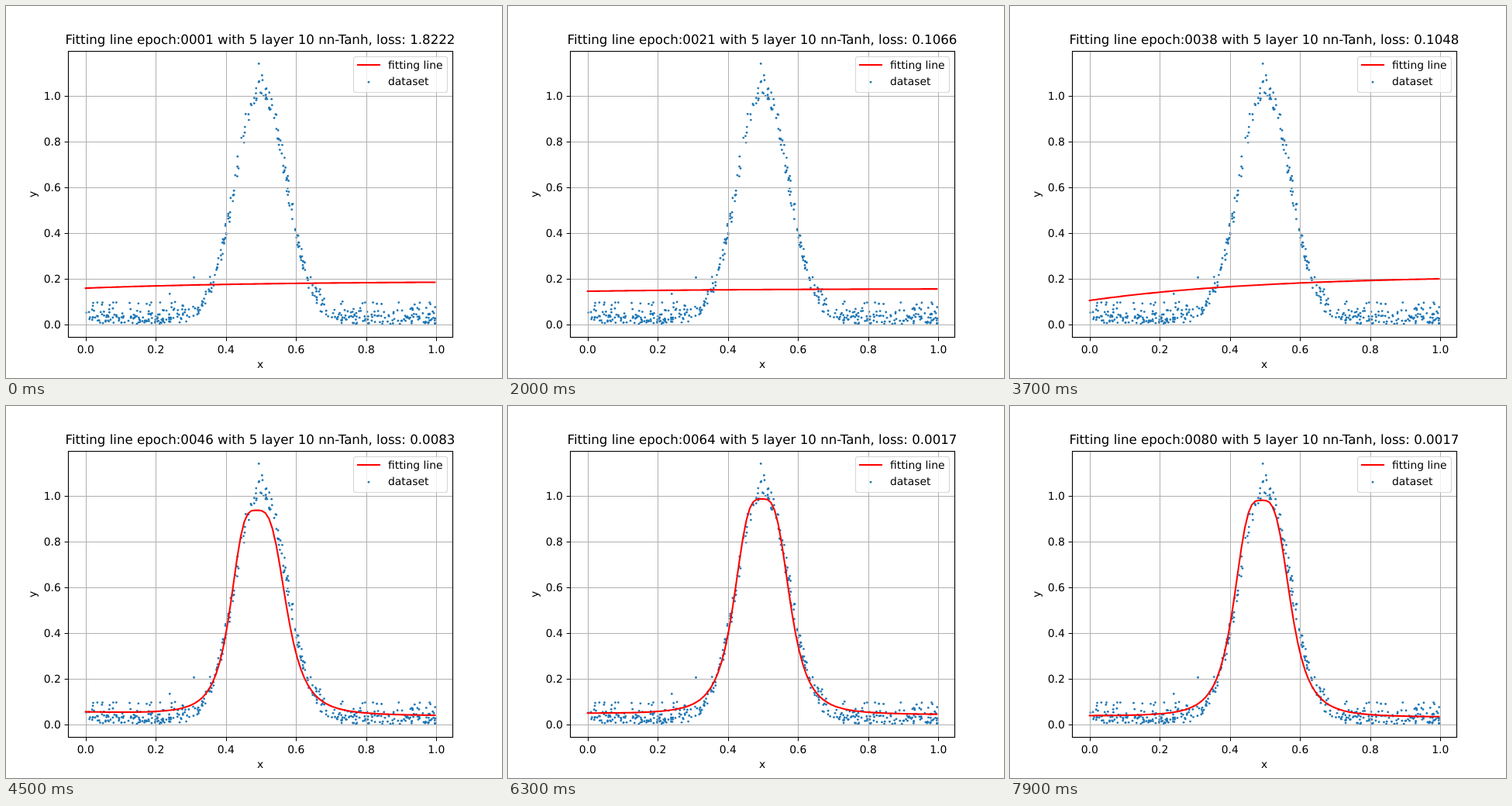
An HTML page with a canvas for the animation above (8000 ms loop, 640 by 480 pixels).

```html
<!DOCTYPE html>
<html lang="en">
<head>
<meta charset="utf-8">
<title>Curve fitting</title>
<style>
html, body { margin: 0; width: 100%; height: 100%; overflow: hidden; background: #fff; }
canvas { display: block; }
</style>
</head>
<body>
<canvas id="stage" width="640" height="480"></canvas>
<script>
const ctx = document.getElementById('stage').getContext('2d');
const EPOCHS = 80, STEP = 100;
const LEFT = 102.7, SCALE_X = 452.5, TOP = 74.4, BOTTOM = 410.55, MAX = 1.143;
const toX = v => LEFT + v * SCALE_X;
const snap = v => Math.floor(v + 0.5) + 0.5;
const lerp = (a, b, u) => a + (b - a) * u;

// Dataset: a bell curve with one-sided noise, plus its most visible outliers
let seed = 20;
const random = () => {
  seed = (seed * 1664525 + 1013904223) % 4294967296;
  return seed / 4294967296;
};
const noise = () => {
  const n = Math.sqrt(-2 * Math.log(1 - random())) * Math.cos(2 * Math.PI * random());
  return Math.min(Math.abs(n) * 0.045, 0.095);
};
const dots = [[0.494, MAX], [0.309, 0.205], [0.24, 0.133]];
while (dots.length < 490) {
  const x = random() * 0.997;
  dots.push([x, Math.exp(-100 * (x - 0.5) ** 2) + noise()]);
}

// Fit: a saturating rise from one level to another, plus a lopsided bump
const flat = { bump: 0, center: 0.5, wl: 0.12, wr: 0.2 };
const keys = [
  { epoch: 1, loss: 1.8222, from: 0.158, to: 0.184, ...flat },
  { epoch: 2, loss: 0.1078, from: 0.147, to: 0.158, ...flat },
  { epoch: 13, loss: 0.1069, from: 0.142, to: 0.149, ...flat },
  { epoch: 29, loss: 0.1063, from: 0.147, to: 0.16, ...flat },
  { epoch: 37, loss: 0.1053, from: 0.124, to: 0.185, ...flat },
  { epoch: 38, loss: 0.1048, from: 0.104, to: 0.199, ...flat },
  { epoch: 42, loss: 0.062, from: -0.02, to: 0.12, bump: 0.4, center: 0.52, wl: 0.12, wr: 0.2 },
  { epoch: 46, loss: 0.0083, from: 0.053, to: 0.037, bump: 0.897, center: 0.487, wl: 0.077, wr: 0.089 },
  { epoch: 64, loss: 0.0017, from: 0.047, to: 0.042, bump: 0.945, center: 0.497, wl: 0.083, wr: 0.083 },
  { epoch: 80, loss: 0.0017, from: 0.036, to: 0.031, bump: 0.95, center: 0.49, wl: 0.082, wr: 0.086 }
];

function stateAt(epoch) {
  const i = Math.max(1, keys.findIndex(k => k.epoch >= epoch));
  const a = keys[i - 1], b = keys[i], u = (epoch - a.epoch) / (b.epoch - a.epoch);
  return Object.fromEntries(Object.keys(a).map(name => [name, lerp(a[name], b[name], u)]));
}

function fitted({ from, to, bump, center, wl, wr }, x) {
  const rise = (1 - Math.exp(-2 * x)) / (1 - Math.exp(-2));
  const d = Math.abs(x - center) / (x < center ? wl : wr);
  return lerp(from, to, rise) + bump / (1 + d ** 3.5);
}

function text(str, x, y, align = 'center', size = 13.889) {
  ctx.font = `${size}px "DejaVu Sans", sans-serif`;
  ctx.textRendering = 'geometricPrecision';
  ctx.textAlign = align;
  ctx.fillStyle = '#000';
  ctx.fillText(str, x, y);
}

function stroke(points, color, width, cap = 'butt') {
  ctx.beginPath();
  points.forEach(([x, y]) => ctx.lineTo(x, y));
  ctx.strokeStyle = color;
  ctx.lineWidth = width;
  ctx.lineCap = cap;
  ctx.lineJoin = 'round';
  ctx.stroke();
}

function dot(x, y) {
  ctx.beginPath();
  ctx.arc(x, y, 1.4, 0, 2 * Math.PI);
  ctx.fillStyle = '#1f77b4';
  ctx.fill();
}

function legend() {
  ctx.beginPath();
  ctx.roundRect(448.5, 65.5, 121, 46, 3);
  ctx.fillStyle = 'rgba(255,255,255,.8)';
  ctx.fill();
  ctx.strokeStyle = 'rgba(204,204,204,.8)';
  ctx.lineWidth = 1.1;
  ctx.stroke();
  stroke([[454, 76], [482, 76]], '#f00', 2.08, 'square');
  dot(468, 98.2);
  text('fitting line', 493, 81, 'left');
  text('dataset', 493, 102, 'left');
}

function draw(epoch) {
  const state = stateAt(epoch);
  const curve = Array.from({ length: 100 }, (_, i) => {
    const x = i / 99 * 0.996;
    return [x, fitted(state, x)];
  });
  // The y axis grows when the curve dips below the data
  const min = Math.min(0, ...curve.map(p => p[1]));
  const toY = v => lerp(BOTTOM, TOP, (v - min) / (MAX - min));
  const place = ([x, y]) => [toX(x), toY(y)];

  ctx.fillStyle = '#fff';
  ctx.fillRect(0, 0, 640, 480);
  dots.forEach(p => dot(...place(p)));

  for (let v = 0; v <= 5; v++) {
    const label = (v / 5).toFixed(1);
    const x = toX(v / 5), y = toY(v / 5), col = snap(x), row = snap(y);
    stroke([[col, 58], [col, 427]], '#b0b0b0', 1);
    stroke([[80, row], [576, row]], '#b0b0b0', 1);
    stroke([[col, 427.5], [col, 432.4]], '#000', 1);
    stroke([[80.5, row], [75.6, row]], '#000', 1);
    text(label, x, 448);
    text(label, 70.8, Math.floor(y + 5.5), 'right');
  }

  stroke(curve.map(place), '#f00', 2.08, 'square');
  ctx.strokeStyle = '#000';
  ctx.lineWidth = 1.11;
  ctx.lineJoin = 'miter';
  ctx.strokeRect(80.5, 58.5, 496, 369);

  text('x', 328, 467);
  ctx.save();
  ctx.translate(38.5, 243);
  ctx.rotate(-Math.PI / 2);
  text('y', 0, 0);
  ctx.restore();
  const number = String(epoch).padStart(4, '0');
  text(`Fitting line epoch:${number} with 5 layer 10 nn-Tanh, loss: ${state.loss.toFixed(4)}`, 328, 49, 'center', 16.667);
  legend();
}

const start = performance.now();
let shown = 0;
function tick() {
  const epoch = Math.floor((performance.now() - start) / STEP) % EPOCHS + 1;
  if (epoch !== shown) draw(shown = epoch);
  requestAnimationFrame(tick);
}
tick();
</script>
</body>
</html>
```
